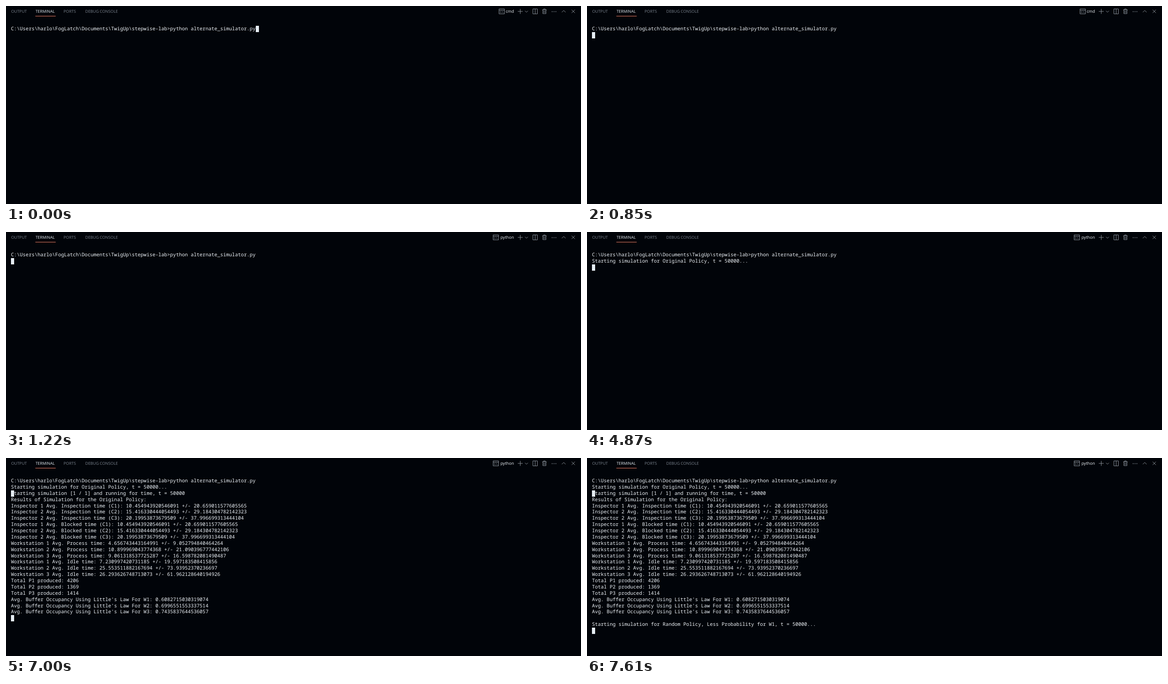
Write an HTML page that moves like this. It is 1273 px wide and 440 px high and loops after 8000 ms.

```html
<!DOCTYPE html>
<html lang="en">
<head>
<meta charset="utf-8">
<title>Terminal session</title>
<style>
  html, body { margin: 0; width: 100%; height: 100%; overflow: hidden; background: #010409; }
  body { position: relative; text-rendering: geometricPrecision; }
  .ui, #screen, .cursor, #icons { position: absolute; }
  .ui { top: 5px; line-height: 14px; white-space: nowrap; color: #7d8590;
        font-family: "Open Sans", "Noto Sans", sans-serif; font-size: 8.8px; }
  .ui.active { color: #e6edf3; }
  #shell { right: calc(100% - 1124.5px); color: #f0f4f8; font-size: 9.1px; font-weight: 500; }
  #line { position: absolute; left: 65px; top: 22px; width: 45px; height: 1px; background: #f78166; }
  #screen { left: 11px; top: 44px; margin: 0; color: #f0f4f8;
            font: 500 10.883px/13.88px "Noto Sans Mono", "DejaVu Sans Mono", monospace; }
  .cursor { width: 7px; height: 14px; background: #e6edf3; }
  #icons { left: 0; top: 0; fill: none; stroke: #8b929a; stroke-width: 1; }
</style>
</head>
<body>
<span class="ui" style="left:11.5px">OUTPUT</span>
<span class="ui active" style="left:65.5px">TERMINAL</span>
<span class="ui" style="left:127.5px">PORTS</span>
<span class="ui" style="left:175.5px">DEBUG CONSOLE</span>
<div id="line"></div>
<span class="ui" id="shell"></span>

<svg id="icons" width="1273" height="30" viewBox="0 0 1273 30">
  <g id="box">
    <path d="M1091.5 6.5h12v11h-12zM1091.5 9.5h12"/>
    <path stroke-width=".8" d="M1096 12.2q-2.4-.6-2.4 1.3t2.4 1.3M1097.6 12.6v.8M1097.6 14.2v.8M1099 11.8l2 3.6"/>
  </g>
  <path d="M1133 12h11M1138.5 6.5v11"/>
  <path d="M1149 10.7l3.3 3.3 3.3-3.3"/>
  <path d="M1166.5 6.5h10v11h-10zM1171.5 6.5v11"/>
  <path d="M1187 8.5h10M1190 8.5v-2h4v2M1188.5 8.5v8.5h7v-8.5M1190.7 10.5v5M1193.3 10.5v5"/>
  <g fill="#8b929a" stroke="none">
    <circle cx="1209.2" cy="12.5" r=".9"/><circle cx="1213.3" cy="12.5" r=".9"/><circle cx="1217.4" cy="12.5" r=".9"/>
  </g>
  <path d="M1230.5 14l4.2-4.2 4.2 4.2"/>
  <path d="M1252.3 8.3l7.2 7.2M1259.5 8.3l-7.2 7.2"/>
</svg>

<pre id="screen"></pre>
<div class="cursor"></div>
<div class="cursor"></div>

<script>
const LOOP = 8000, COL = 6.53, ROW = 13.88, LEFT = 11, TOP = 44;

const inspections = [
  "(C1): 10.454943920546091 +/- 20.659011577605565",
  "(C2): 15.416330444054493 +/- 29.184304782142323",
  "(C3): 20.19953873679509 +/- 37.996699313444104"
];
const inspector = kind => inspections.map((v, i) => `Inspector ${i ? 2 : 1} Avg. ${kind} time ${v}`);
const station = (kind, values) => values.map((v, i) => `Workstation ${i + 1} Avg. ${kind} time: ${v}`);

const lines = [
  String.raw`C:\Users\harlo\FogLatch\Documents\TwigUp\stepwise-lab>python alternate_simulator.py`,
  "Starting simulation for Original Policy, t = 50000...",
  "Starting simulation [1 / 1] and running for time, t = 50000",
  "Results of Simulation for the Original Policy:",
  ...inspector("Inspection"),
  ...inspector("Blocked"),
  ...station("Process", [
    "4.656743443164991 +/- 9.052794840464264",
    "10.899969043774368 +/- 21.090396777442106",
    "9.061318537725287 +/- 16.598782081490487"
  ]),
  ...station("Idle", [
    "7.230997420731185 +/- 19.597183508415856",
    "25.553511882167694 +/- 73.93952370236697",
    "26.293626748713073 +/- 61.962128640194926"
  ]),
  ...["4206", "1369", "1414"].map((v, i) => `Total P${i + 1} produced: ${v}`),
  ...["0.6082715030319074", "0.6996551553337514", "0.7435837644536057"]
    .map((v, i) => `Avg. Buffer Occupancy Using Little's Law For W${i + 1}: ${v}`),
  "",
  "Starting simulation for Random Policy, Less Probability for W1, t = 50000..."
];

// Cursors are [column, row]; a stale one stays behind during fast output.
const steps = [
  { at: 0,    shell: "cmd",    rows: 1,  cursors: [[83, 0]] },
  { at: 290,  shell: "cmd",    rows: 1,  cursors: [[0, 1]] },
  { at: 1220, shell: "python", rows: 1,  cursors: [[0, 1]] },
  { at: 1680, shell: "python", rows: 2,  cursors: [[0, 2]] },
  { at: 7000, shell: "python", rows: 22, cursors: [[0, 2], [0, 22]] },
  { at: 7020, shell: "python", rows: 24, cursors: [[0, 2], [0, 24]] }
];

const byId = id => document.getElementById(id);
const screenEl = byId("screen"), shellEl = byId("shell"), boxEl = byId("box");
const cursorEls = document.querySelectorAll(".cursor");
let shown = null;

function show(step) {
  screenEl.textContent = lines.slice(0, step.rows).join("\n");
  shellEl.textContent = step.shell;
  boxEl.setAttribute("transform", `translate(${step.shell === "cmd" ? 0 : -13} 0)`);
  cursorEls.forEach((el, i) => {
    const pos = step.cursors[i];
    el.hidden = !pos;
    if (!pos) return;
    el.style.left = LEFT + pos[0] * COL + "px";
    el.style.top = TOP + pos[1] * ROW + "px";
  });
}

function tick() {
  const t = performance.now() % LOOP;
  const step = steps.findLast(s => s.at <= t);
  if (step !== shown) show(shown = step);
  requestAnimationFrame(tick);
}
tick();
</script>
</body>
</html>
```
